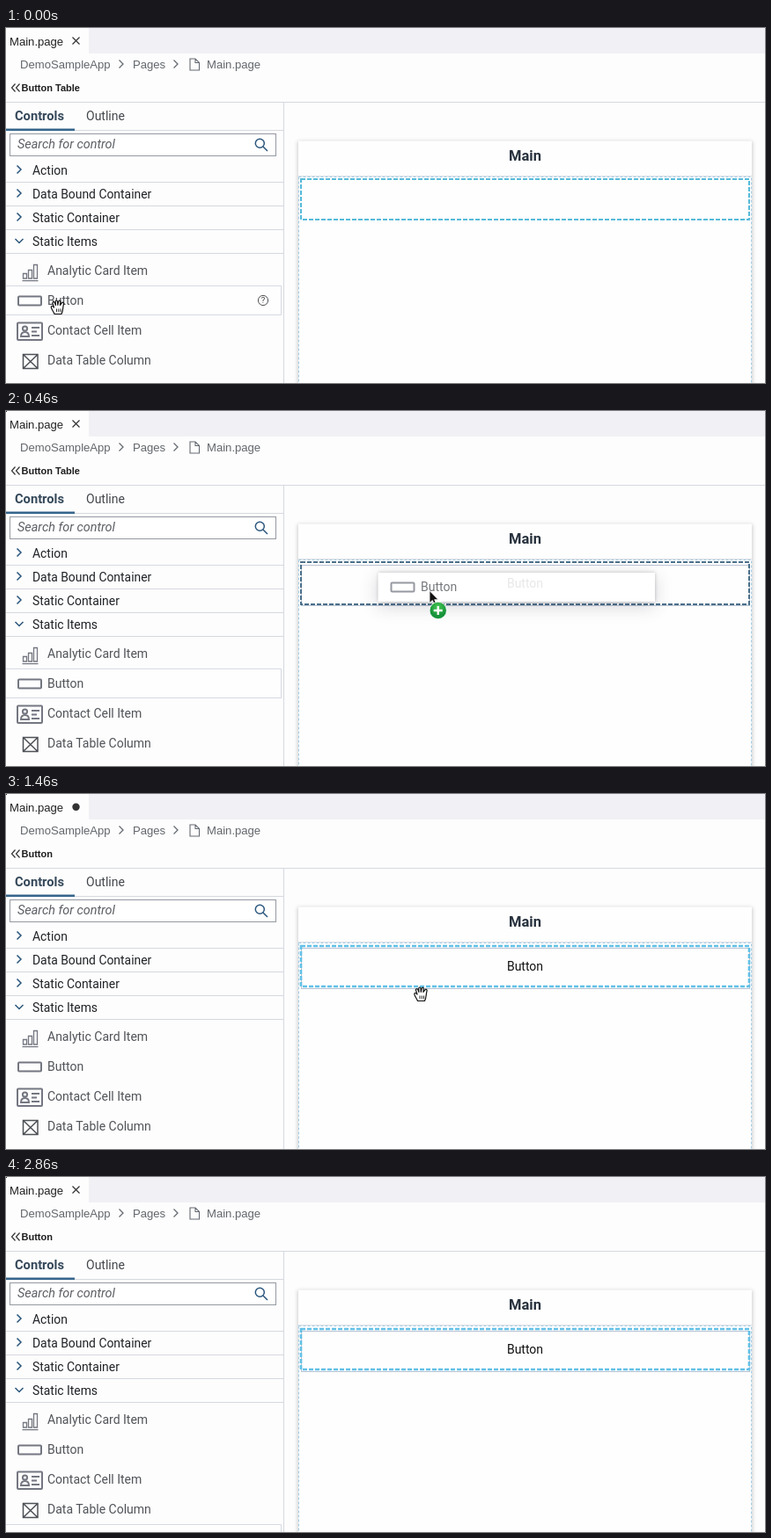
Write an HTML page that moves like this. It is 862 px wide and 404 px high and loops after 3260 ms.

```html
<!DOCTYPE html>
<html lang="en">
<head>
<meta charset="utf-8">
<title>Drag a button onto the page</title>
<style>
  html, body { margin: 0; width: 100%; height: 100%; overflow: hidden; background: #fdfdfd; }
  svg { display: block; width: 862px; height: 404px; font: 14px Roboto, sans-serif; }
  text { white-space: pre; }
  .plain { font: 13.1px "Liberation Sans", sans-serif; }
  .crumb { fill: #62666b; }
  .group { fill: #1f2226; font-size: 13.9px; }
  .item { fill: #505358; }
  .line { fill: none; stroke: #d5d9df; }
  .icon { fill: none; stroke: #747781; }
  .blue { fill: none; stroke: #2a567c; stroke-width: 1.5; }
  .dark { fill: none; stroke: #333; stroke-width: 1.2; }
  .card {
    width: 314px; height: 33px; background: rgba(255, 255, 255, .9);
    box-shadow: 0 0 4px rgba(0, 0, 0, .22), 0 5px 20px rgba(60, 60, 80, .22);
  }
</style>
</head>
<body>
<svg viewBox="0 0 862 404">
  <defs>
    <rect id="buttonIcon" class="icon" x="1" y="-5" width="26" height="10" rx="1" stroke-width="2"/>
    <path id="chevron" d="M-2.5 -4.5 L2 0 L-2.5 4.5"/>
    <filter id="near" x="-10%" y="-50%" width="120%" height="200%"><feGaussianBlur stdDeviation="2"/></filter>
    <radialGradient id="green" cy=".3"><stop offset="0" stop-color="#48c853"/><stop offset="1" stop-color="#16933a"/></radialGradient>
  </defs>

  <!-- editor tab, breadcrumb and title -->
  <rect width="862" height="404" fill="#fdfdfd"/>
  <rect x="94" width="768" height="29" fill="#f1f1f5"/>
  <rect id="corner" width="1" height="1" fill="#222"/>
  <text class="plain" x="4" y="19.5" fill="#222">Main.page</text>
  <path id="close" class="dark" d="M75.5 10.5 l8 8 m0 -8 l-8 8"/>
  <circle id="unsaved" cx="79.5" cy="14.7" r="4.2" fill="#333"/>
  <g class="plain crumb">
    <text x="16" y="46">DemoSampleApp</text>
    <text x="144" y="46">Pages</text>
    <text x="228" y="46">Main.page</text>
  </g>
  <g fill="none" stroke="#666b72" stroke-width="1.3">
    <use href="#chevron" x="131" y="41"/>
    <use href="#chevron" x="193" y="41"/>
    <path d="M209 35 h6 l4.5 4.5 v8.5 h-10.5 z M215 35 v4.5 h4.5" stroke-width="1.1"/>
  </g>
  <path class="dark" d="M10.5 63.5 l-4 4.5 l4 4.5 m5 -9 l-4 4.5 l4 4.5"/>
  <text id="title" x="17.5" y="71.8" fill="#1d1d1f" style="font:bold 11px 'Liberation Sans',sans-serif"></text>

  <!-- control palette -->
  <path class="line" d="M0 84.5 H862 M315.5 85 V404 M0 116.5 H315 M0 175.5 H315 M0 202.5 H315 M0 229.5 H315 M0 256.5 H315"/>
  <rect y="114.5" width="78" height="2.5" fill="#35658b"/>
  <text x="10" y="105" fill="#35485a" font-weight="bold" font-size="14.7">Controls</text>
  <text x="91" y="105" fill="#43474c">Outline</text>
  <rect x="4.5" y="120.5" width="302" height="25" fill="#fff" stroke="#949aa1"/>
  <text x="13" y="137" fill="#5c5f64" font-style="italic" font-size="14.4">Search for control</text>
  <path class="blue" d="M292 135 l5 5" stroke-width="2"/>
  <circle class="blue" cx="288.3" cy="131.3" r="5"/>
  <g class="blue">
    <use href="#chevron" x="15" y="161"/>
    <use href="#chevron" x="15" y="188"/>
    <use href="#chevron" x="15" y="215"/>
    <use href="#chevron" transform="translate(15 242.5) rotate(90)"/>
  </g>
  <g class="group">
    <text x="30" y="167">Action</text>
    <text x="30" y="194">Data Bound Container</text>
    <text x="30" y="221">Static Container</text>
    <text x="30" y="248">Static Items</text>
  </g>
  <g id="hover">
    <path d="M0 .5 H312.5 V33.5 H0" fill="#fefefe" stroke="#d6d9e4"/>
    <g id="help">
      <circle cx="292" cy="17" r="5.6" fill="none" stroke="#505357"/>
      <text x="292" y="20.3" font-size="9.5" text-anchor="middle" fill="#444">?</text>
    </g>
  </g>
  <g class="icon">
    <path d="M19.5 285 v-5.5 h4 v5.5 z M25.5 285 v-9.5 h4 v9.5 z M31.5 285 v-15.5 h4 v15.5 z M18.5 287.7 h18" stroke-width="1.3"/>
    <g stroke-width="2">
      <rect x="13" y="335.5" width="28" height="19.5" rx="1"/>
      <circle cx="21.5" cy="342" r="2.6"/>
      <path d="M17 351 q0 -5 4.5 -5 t4.5 5 z M29 341 h9 M29 345.5 h6 M29 350 h9"/>
    </g>
    <path d="M19.5 371.5 h16.5 v16 h-16.5 z l16.5 16 m0 -16 l-16.5 16" stroke="#4d5056" stroke-width="1.5"/>
  </g>
  <use href="#buttonIcon" x="13" y="310.5"/>
  <g class="item">
    <text x="47" y="280.5">Analytic Card Item</text>
    <text x="47" y="315">Button</text>
    <text x="47" y="349">Contact Cell Item</text>
    <text x="47" y="383">Data Table Column</text>
  </g>

  <!-- page canvas -->
  <rect x="331" y="129" width="517" height="290" fill="#777" opacity=".35" filter="url(#near)"/>
  <rect x="332" y="128.5" width="515" height="290" fill="#fefefe"/>
  <text x="589.5" y="150.5" text-anchor="middle" font-size="16.5" font-weight="bold" fill="#27313d">Main</text>
  <path class="line" d="M332 168.5 H847" stroke-opacity=".8"/>
  <rect x="332.5" y="169.5" width="514" height="250" fill="none" stroke="#a5cde6" stroke-dasharray="3 2"/>
  <g id="placed">
    <rect x="335.5" y="175.5" width="509" height="46" fill="none" stroke="#b9c3d2"/>
    <text x="589.5" y="200.5" text-anchor="middle" fill="#111">Button</text>
  </g>
  <rect id="slot" x="335" width="509" fill="none" stroke-dasharray="5 2"/>

  <!-- dragged copy and pointers -->
  <g id="ghost">
    <foreignObject width="314" height="33" overflow="visible"><div class="card"></div></foreignObject>
    <use href="#buttonIcon" x="14" y="16.5" opacity=".75"/>
    <text x="48.5" y="21" fill="#75787c">Button</text>
  </g>
  <g id="arrow">
    <path d="M0 0 V14 L3.3 11 L5.7 16.3 L8 15.3 L5.7 10.2 H10 Z" fill="#111" stroke="#fff" stroke-width=".8"/>
    <g id="plus">
      <circle cx="9.7" cy="22.5" r="9.7" fill="url(#green)" stroke="#fff" stroke-width=".8"/>
      <path d="M9.7 17.5 v10 m-5 -5 h10" stroke="#fff" stroke-width="2.3"/>
    </g>
  </g>
  <g id="hand" fill="#fff" stroke="#111" stroke-width="1.2" stroke-linejoin="round">
    <path d="M-4 8 C-5 5 -8 2 -7.7 0 C-7.5 -1.5 -6 -1.3 -4.5 .5 L-6 -4 C-6.5 -6 -4.3 -6.5 -3.6 -4.6 L-2.6 -2 L-2.8 -6 C-2.8 -8 -.6 -8 -.5 -6 L-.2 -2.2 L.6 -6.2 C1 -8 3 -7.6 2.8 -5.6 L2.4 -2 L4.4 -4.6 C5.4 -6 7.2 -5 6.5 -3.2 C5.5 0 6 4 4 8 Z"/>
    <path d="M-1.5 2 v3.5 M.8 2 v3.5 M3 2 v3.5" stroke-width=".9"/>
  </g>
</svg>
<script>
const LOOP = 3260;
const el = id => document.getElementById(id);
const show = (id, on) => el(id).style.display = on ? "" : "none";
const place = (id, at) => {
  show(id, at);
  if (at) el(id).setAttribute("transform", `translate(${at})`);
};
const outline = (stroke, y, height, width = 2) => ({ stroke, y, height, "stroke-width": width });

// Every step keeps the values of the one before unless it changes them.
const steps = [
  { at: 0, hover: 293, help: true, hand: [59, 317.5], slot: outline("#55bad9", 172, 46) },
  { at: 30, help: false, hand: null, ghost: [288, 246], arrow: [354, 264], plus: true, slot: outline("#4f7a97", 172, 46) },
  { at: 260, ghost: [360, 229], arrow: [424, 248] },
  { at: 460, ghost: [422.5, 184], arrow: [481, 204.5], placed: true, slot: outline("#4a6f8a", 172, 48) },
  { at: 860, ghost: null, plus: false },
  { at: 1060, arrow: null, hand: [482.5, 207.5], help: true, dropped: true, unsaved: true, slot: outline("#62c0e6", 173, 46, 2.6) },
  { at: 1460, hand: [471.5, 227.5], hover: null },
  { at: 1660, hand: [215.5, 391], hover: 361 },
  { at: 1860, hand: null, hover: 395, help: false },
  { at: 2060, unsaved: false },
];

function draw(time) {
  const s = Object.assign({}, ...steps.filter(step => step.at <= time));
  place("hover", s.hover && [0, s.hover]);
  place("hand", s.hand);
  place("ghost", s.ghost);
  place("arrow", s.arrow);
  show("help", s.help);
  show("plus", s.plus);
  show("placed", s.placed);
  show("unsaved", s.unsaved);
  show("close", !s.unsaved);
  show("corner", time >= 30);
  el("title").textContent = s.dropped ? "Button" : "Button Table";
  for (const [name, value] of Object.entries(s.slot)) el("slot").setAttribute(name, value);
}

const start = performance.now();
function tick() {
  draw((performance.now() - start) % LOOP);
  requestAnimationFrame(tick);
}
tick();
</script>
</body>
</html>
```
